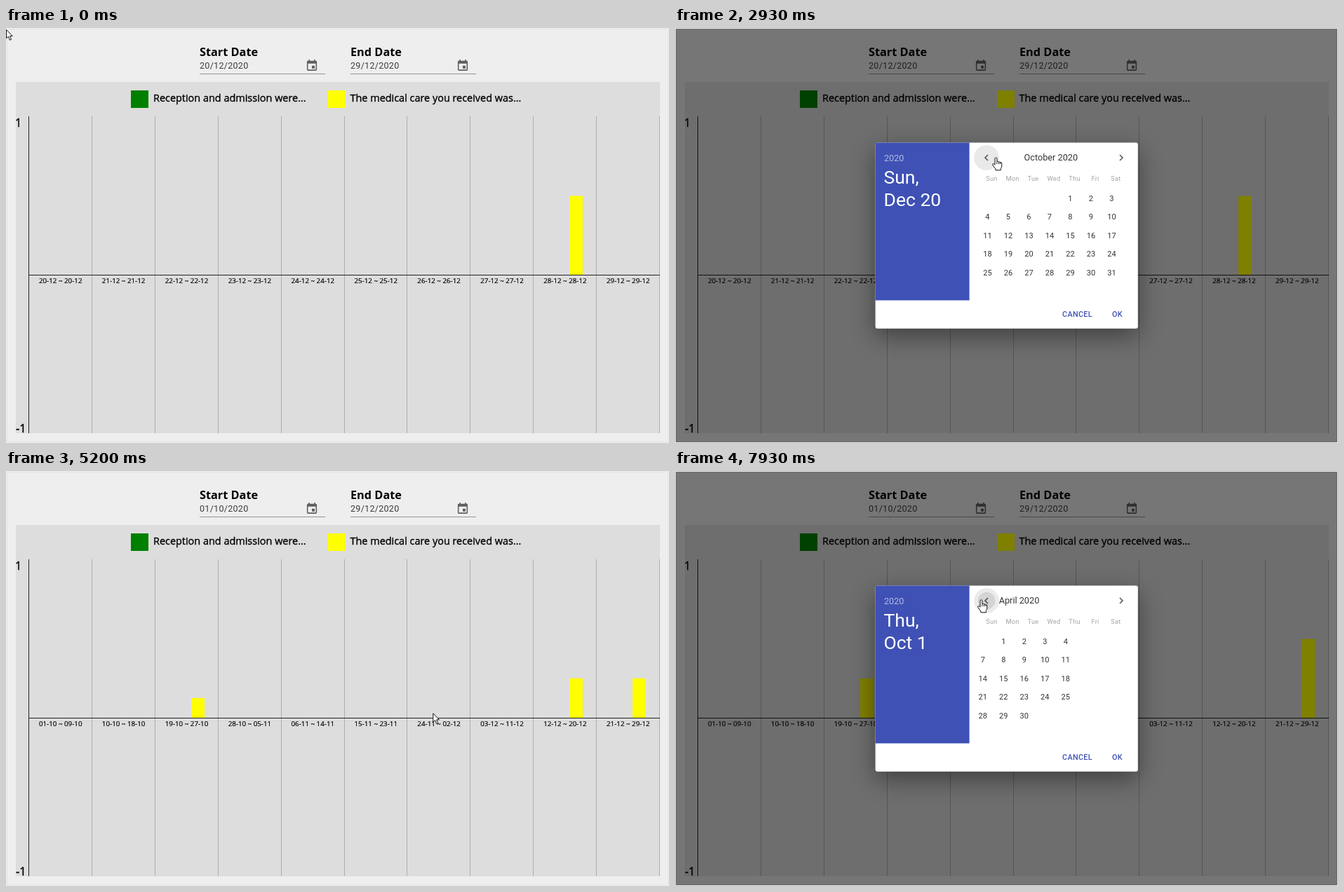
Animation of 945 by 592 pixels, one loop 8 s. Source, as an HTML page with a canvas:

```html
<!DOCTYPE html>
<html lang="en">
<head>
<meta charset="utf-8">
<title>Survey chart with date picker</title>
<style>
html, body { margin: 0; width: 100%; height: 100%; overflow: hidden; background: #eee; }
canvas { display: block; }
</style>
</head>
<body>
<canvas id="stage" width="945" height="592"></canvas>
<script>
const W = 945, H = 592, LOOP = 8000, STEP = 1000 / 15;
const screen = document.getElementById('stage').getContext('2d');
const layer = document.createElement('canvas');
layer.width = W;
layer.height = H;
const sheet = layer.getContext('2d');
let g = screen;

const UI = '"Open Sans", "Noto Sans", sans-serif';
const ROBOTO = 'Roboto, sans-serif';
const BLUE = '#3f51b5';
const DAY = 864e5;
const WEEK = ['Sun', 'Mon', 'Tue', 'Wed', 'Thu', 'Fri', 'Sat'];
const MONTHS = ['January', 'February', 'March', 'April', 'May', 'June', 'July',
  'August', 'September', 'October', 'November', 'December'];

const PREV = { x: 444, y: 185, r: 18 };
const ICON = { x: 436, y: 52, r: 17 };
const OPEN1 = 1186, PICK = 3480, CLOSE1 = 4484, RELABEL = 4600, DATA = 5000, OPEN2 = 6084;
const CLICKS1 = [2390, 2688];
const CLICKS2 = [6960, 7132, 7304, 7476, 7648, 7821];

// time, x, y of the pointer hot spot
const PATH = [
  [0, 0, 2], [870, 437, 48], [1190, 437, 49], [1270, 435, 66], [1740, 457, 204],
  [1840, 457, 204], [2000, 457, 184], [2960, 457, 184], [3330, 569, 240],
  [3530, 569, 240], [3860, 641, 418], [4060, 643, 410], [4860, 642, 408],
  [5000, 640, 400], [5800, 437, 50], [6040, 437, 50], [6133, 413, 99],
  [6300, 415, 130], [6700, 436, 183], [8000, 436, 183]
];

const clamp = v => Math.max(0, Math.min(1, v));
const smooth = v => { v = clamp(v); return v * v * (3 - 2 * v); };

function bezier(x1, y1, x2, y2) {
  const at = (a, b, s) => 3 * a * s * (1 - s) ** 2 + 3 * b * s * s * (1 - s) + s ** 3;
  return x => {
    if (x <= 0) return 0;
    if (x >= 1) return 1;
    let lo = 0, hi = 1;
    for (let i = 0; i < 20; i++) {
      const mid = (lo + hi) / 2;
      if (at(x1, x2, mid) < x) lo = mid; else hi = mid;
    }
    return at(y1, y2, lo);
  };
}
const fadeEase = bezier(.4, 0, .2, 1);
const slideEase = bezier(.35, .8, .4, 1);

function text(str, x, y, font, color, align = 'left', spacing = 0) {
  g.font = font;
  g.fillStyle = color;
  g.textAlign = align;
  g.letterSpacing = spacing + 'px';
  g.fillText(str, x, y);
}
// Regular letters thickened to a medium weight.
function medium(str, x, y, size, thick, align) {
  text(str, x, y, size + 'px ' + UI, '#000', align);
  g.strokeStyle = '#000';
  g.lineWidth = thick;
  g.lineJoin = 'round';
  g.strokeText(str, x, y);
}
function rect(x, y, w, h, color) {
  g.fillStyle = color;
  g.fillRect(x, y, w, h);
}
function disc(x, y, r, color) {
  g.fillStyle = color;
  g.beginPath();
  g.arc(x, y, r, 0, 7);
  g.fill();
}
function clipped(x, y, w, h, draw, radius = 0) {
  g.save();
  g.beginPath();
  g.roundRect(x, y, w, h, radius);
  g.clip();
  draw();
  g.restore();
}
function ripple(t, start, x, y, r, rgb, strength) {
  const age = t - start;
  if (age < 0 || age > 650) return;
  const a = strength * (.4 + .6 * smooth(age / 200)) * (1 - fadeEase((age - 130) / 520));
  disc(x, y, r * (.25 + .75 * smooth(age / 330)), `rgba(${rgb},${a})`);
}

function pointer(t) {
  let i = 0;
  while (i < PATH.length - 2 && PATH[i + 1][0] <= t) i++;
  const [t0, x0, y0] = PATH[i], [t1, x1, y1] = PATH[i + 1];
  const k = smooth((t - t0) / (t1 - t0));
  return { x: x0 + (x1 - x0) * k, y: y0 + (y1 - y0) * k };
}
const within = (p, c) => Math.hypot(p.x - c.x, p.y - c.y) < c.r;
const overOk = p => p.x > 609 && p.x < 654 && p.y > 394 && p.y < 424;

const eventIcon = new Path2D('M17 12h-5v5h5v-5zM16 1v2H8V1H6v2H5c-1.11 0-1.99.9-1.99 2L3 19' +
  'c0 1.1.89 2 2 2h14c1.1 0 2-.9 2-2V5c0-1.1-.9-2-2-2h-1V1h-2zm3 18H5V8h14v11z');

function dateField(x, label, value, active) {
  text(label, x, 40, '700 16.3px ' + UI, '#000');
  text(value, x, 57.5, '12.5px ' + ROBOTO, 'rgba(0,0,0,.75)', 'left', .3);
  rect(x, 65, 179, 1, active ? '#333' : '#949494');
  g.save();
  g.translate(x + 160 - 12 * .79, 53 - 11 * .79);
  g.scale(.79, .79);
  g.fillStyle = 'rgba(0,0,0,.6)';
  g.fill(eventIcon);
  g.restore();
}

function shortDate(ms) {
  const d = new Date(ms);
  return [d.getUTCDate(), d.getUTCMonth() + 1].map(n => String(n).padStart(2, '0')).join('-');
}

function chart(t) {
  rect(14, 77, 918, 501, '#ddd');
  rect(178, 89, 25, 25, '#008000');
  rect(459, 89, 25, 25, '#ff0');
  medium('Reception and admission were...', 210, 105, 14.45, .35);
  medium('The medical care you received was...', 490.5, 105, 14.45, .35);
  medium('1', 13, 141, 16.5, .35);
  medium('-1', 14, 577, 16.5, .35);

  const late = t >= RELABEL, span = late ? 9 : 1;
  const first = late ? Date.UTC(2020, 9, 1) : Date.UTC(2020, 11, 20);
  const k = smooth((t - DATA) / 400);
  const values = { 2: .25 * k, 8: .5 * (1 - k), 9: .5 * k };
  for (let i = 0; i < 10; i++) {
    const x = 32.5 + i * 89.9;
    rect(Math.floor(x + 89.9), 126, 1, 452, '#adadad');
    const h = 225 * (values[i] || 0);
    if (h > 0) rect(Math.round(x + 51.2), 352 - h, 19, h, '#ff0');
    const from = first + i * span * DAY;
    medium(shortDate(from) + ' ~ ' + shortDate(from + (span - 1) * DAY),
      x + 45.2, 364, 9.75, .2, 'center');
  }
  rect(32, 126, 1, 452, '#222');
  rect(32, 352, 900, 1, '#222');
}

function page(t, p) {
  rect(0, 0, W, H, '#eee');
  g.strokeStyle = '#e4e4e4';
  g.lineWidth = 1;
  g.strokeRect(1.5, 1.5, W - 3, H - 3);
  const free = t < OPEN1 + 120 || (t > CLOSE1 + 195 && t < OPEN2 + 120);
  const hover = free && (within(p, ICON) || (t > OPEN1 && t < OPEN1 + 120) || t > OPEN2);
  if (hover) disc(ICON.x, ICON.y, ICON.r, 'rgba(0,0,0,.04)');
  ripple(t, 1080, ICON.x, ICON.y, 15, '0,0,0', .2);
  ripple(t, 5800, ICON.x, ICON.y, ICON.r, '0,0,0', .12);
  dateField(276, 'Start Date', t < CLOSE1 ? '20/12/2020' : '01/10/2020', hover);
  dateField(491, 'End Date', '29/12/2020', false);
  chart(t);
}

function chevron(x, dir, alpha) {
  g.strokeStyle = `rgba(0,0,0,${alpha})`;
  g.lineWidth = 1.6;
  g.beginPath();
  g.moveTo(x - 2 * dir, 181);
  g.lineTo(x + 2 * dir, 185);
  g.lineTo(x - 2 * dir, 189);
  g.stroke();
}

function monthGrid(month, shift, chosen) {
  const lead = new Date(2020, month, 1).getDay();
  const count = new Date(2020, month + 1, 0).getDate();
  const dx = shift * 226, dy = shift ? .7 : 0;
  for (let d = 1; d <= count; d++) {
    const cell = lead + d - 1;
    const x = 451.5 + cell % 7 * 29.5 + dx;
    const y = 242.2 + Math.floor(cell / 7) * 26.5 + dy;
    const on = chosen.month === month && chosen.day === d;
    let color = 'rgba(0,0,0,.8)';
    if (month === 11 && d === 29) color = BLUE;
    if (month === 11 && d > 29) color = 'rgba(0,0,0,.38)';
    if (on) {
      disc(x, y + .3, 13.2, BLUE);
      color = '#fff';
    }
    text(d, x, y + 4, (on ? '500' : '400') + ' 11px ' + ROBOTO, color, 'center', .1);
  }
}

// Each click brings the earlier month in from the left and pushes the current one out.
function slides(t, base, clicks) {
  const list = [];
  const enter = (i, at) => i ? slideEase((at - clicks[i - 1]) / 350) - 1 : 0;
  for (let i = 0; i <= clicks.length; i++) {
    if (i && t < clicks[i - 1]) break;
    let shift = enter(i, t);
    if (i < clicks.length && t >= clicks[i]) {
      const from = enter(i, clicks[i]);
      shift = from + (2 - from) * slideEase((t - clicks[i]) / 350);
    }
    if (Math.abs(shift) < 1.06) list.push({ month: base - i, shift });
  }
  return list;
}

function dialog(t, p, base, clicks, chosen) {
  g.clearRect(0, 0, W, H);
  g.save();
  g.shadowColor = 'rgba(0,0,0,.42)';
  g.shadowBlur = 34;
  g.shadowOffsetY = 11;
  g.fillStyle = '#fff';
  g.beginPath();
  g.roundRect(285.6, 163.5, 374.2, 265.2, 3);
  g.fill();
  g.restore();

  g.fillStyle = BLUE;
  g.beginPath();
  g.roundRect(285.6, 163.5, 134, 225.1, [3, 0, 0, 0]);
  g.fill();
  const big = '26.5px ' + ROBOTO;
  text('2020', 298, 190, '12.6px ' + ROBOTO, 'rgba(255,255,255,.6)');
  const weekday = WEEK[new Date(2020, chosen.month, chosen.day).getDay()];
  text(weekday + ',', 297.5, 222, big, '#fff');
  text(MONTHS[chosen.month].slice(0, 3) + ' ' + chosen.day, 297.5, 254, big, '#fff');

  if (within(p, PREV)) disc(PREV.x, PREV.y, PREV.r, 'rgba(0,0,0,.045)');
  for (const c of clicks) ripple(t, c - 70, PREV.x, PREV.y, PREV.r, '0,0,0', .1);
  const moved = base < 11 || t >= clicks[0];
  chevron(444, -1, .65);
  chevron(636, 1, moved ? .65 : .28);

  const shown = slides(t, base, clicks);
  clipped(462, 170, 156, 32, () => {
    for (const s of shown) {
      text(MONTHS[s.month] + ' 2020', 540 + s.shift * 156, 189,
        '12.7px ' + ROBOTO, 'rgba(0,0,0,.8)', 'center');
    }
  });
  WEEK.forEach((name, i) => text(name, 451.5 + i * 29.5, 218,
    '9.2px ' + ROBOTO, 'rgba(0,0,0,.36)', 'center', .3));
  clipped(427, 226, 226, 162, () => {
    for (const s of shown) monthGrid(s.month, s.shift, chosen);
  });

  clipped(609, 395, 45, 28, () => {
    if (overOk(p)) rect(609, 395, 45, 28, 'rgba(63,81,181,.03)');
    ripple(t, 4350, 641, 409, 24, '63,81,181', .23);
  }, 3);
  const action = '500 10.8px ' + ROBOTO;
  text('CANCEL', 552, 412.3, action, BLUE, 'left', .35);
  text('OK', 623, 412.3, action, BLUE, 'left', .35);
}

const arrowShape = new Path2D('M0 0V12.2L2.8 9.7L5 14.8L7 13.9L4.9 9H8.7Z');
const handShape = new Path2D('M-1.5 1.2Q0 -1 1.4 1.2V6Q3 5 4 6.6Q5.6 5.8 6.3 7.3Q8.2 6.8 8.3 8.7' +
  'V12.5Q8.2 14.4 6.8 16V18.3H-.6V16.5L-4.6 11.2Q-5.6 9.2 -3.8 9Q-2.6 9.2 -1.5 10.7Z');

function cursor(p, open) {
  const overDay = p.x > 437 && p.x < 642 && p.y > 229 && p.y < 361;
  const hand = open ? within(p, PREV) || overDay || overOk(p) : within(p, ICON);
  const shape = hand ? handShape : arrowShape;
  g.save();
  g.translate(p.x + .5, p.y + .5);
  g.fillStyle = '#fff';
  g.strokeStyle = '#111';
  g.lineWidth = 1;
  g.lineJoin = 'round';
  g.fill(shape);
  g.stroke(shape);
  if (hand) {
    g.beginPath();
    for (const x of [1.4, 4, 6.3]) {
      g.moveTo(x, 6.6);
      g.lineTo(x, 9.6);
    }
    g.stroke();
  }
  g.restore();
}

function draw(t) {
  const p = pointer(t);
  g = screen;
  page(t, p);
  let fade = 0;
  if (t >= OPEN2) fade = fadeEase((t - OPEN2) / 225);
  else if (t >= CLOSE1) fade = 1 - fadeEase((t - CLOSE1) / 195);
  else fade = fadeEase((t - OPEN1) / 225);
  if (fade > 0) {
    rect(1, 1, W - 2, H - 2, `rgba(0,0,0,${fade / 2})`);
    g = sheet;
    const chosen = t < PICK ? { month: 11, day: 20 } : { month: 9, day: 1 };
    if (t < OPEN2) dialog(t, p, 11, CLICKS1, chosen);
    else dialog(t, p, 9, CLICKS2, chosen);
    g = screen;
    g.globalAlpha = fade;
    g.drawImage(layer, 0, 0);
    g.globalAlpha = 1;
  }
  cursor(p, fade > 0);
}

function tick() {
  const t = performance.now() % LOOP;
  draw(Math.floor((t + 4) / STEP) * STEP % LOOP);
  requestAnimationFrame(tick);
}
tick();
</script>
</body>
</html>
```
